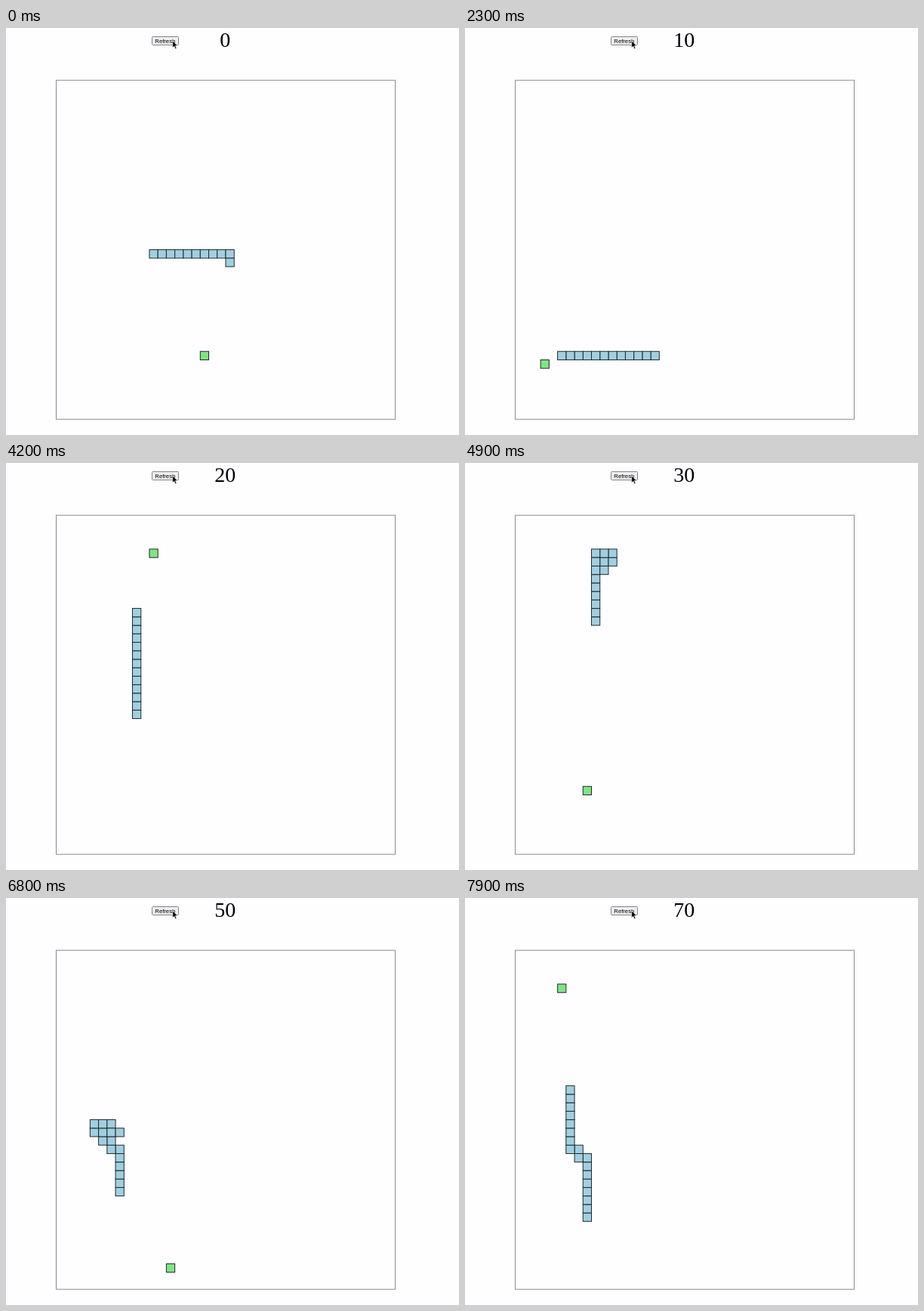
An HTML page that plays this animation: 600x539 px, repeating every 8000 ms.

```html
<!DOCTYPE html>
<html lang="en">
<head>
<meta charset="utf-8">
<title>Snake</title>
<style>
  html, body { margin: 0; width: 100%; height: 100%; overflow: hidden; background: #fefdff; }
  svg { display: block; }
  #score { font: 28px "Liberation Serif", Times, serif; text-anchor: middle; }
  #label { font: 7.7px "Liberation Sans", Arial, sans-serif; text-anchor: middle; }
  .cell { stroke: #1c2a30; stroke-width: 1; }
</style>
</head>
<body>
<svg width="600" height="539" viewBox="0 0 600 539">
  <rect x="193.5" y="11.5" width="35" height="11" rx="1" fill="#efeeef" stroke="#858585"/>
  <text id="label" x="210.8" y="19.8">Refresh</text>
  <path d="M220.7 16.8v9.3l2.1-1.9 1.5 3.5 1.6-.7-1.5-3.4h2.7z" fill="#000" stroke="#fff" stroke-width=".6"/>
  <text id="score" x="290.3" y="25"></text>
  <rect x="66.5" y="69.2" width="449" height="449" fill="none" stroke="#8c8c8c"/>
  <g id="board"></g>
</svg>
<script>
const LOOP = 8000, FRAME = 100;
const SIZE = 11.225, LEFT = 66.47, TOP = 69.08;
const FOODS = [[17, 32], [3, 33], [11, 4], [8, 32], [4, 20], [13, 37], [6, 22], [5, 4]];
// Milliseconds per step; the snake speeds up with every meal
const PACE = [100, 77, 59.5, 46, 34, 25.5, 20, 16];

const board = document.getElementById('board');
const score = document.getElementById('score');
const same = (a, b) => a[0] === b[0] && a[1] === b[1];

// Close the longer distance first; if the body is in the way, use the other axis
function nextCell([x, y], [fx, fy], body) {
  const dx = fx - x, dy = fy - y;
  const options = [[x + Math.sign(dx), y], [x, y + Math.sign(dy)]];
  if (Math.abs(dx) < Math.abs(dy)) options.reverse();
  return options.find(o => !body.some(c => same(c, o))) || options[0];
}

function simulate() {
  let body = Array.from({ length: 10 }, (_, i) => [11 + i, 20]).concat([[20, 21]]);
  let eaten = 0, time = -35;
  const states = [];
  while (time < LOOP) {
    states.push({ time, body, eaten });
    time += PACE[eaten];
    const head = nextCell(body[body.length - 1], FOODS[eaten], body);
    const ate = same(head, FOODS[eaten]);
    body = [...body.slice(ate ? 0 : 1), head];
    if (ate) eaten++;
  }
  return states;
}

const cell = ([x, y], fill) =>
  `<rect class="cell" x="${LEFT + x * SIZE}" y="${TOP + y * SIZE}" width="${SIZE}" height="${SIZE}" fill="${fill}"/>`;

const states = simulate();
let shown;

function draw(now) {
  const time = Math.floor((now % LOOP) / FRAME) * FRAME;
  const state = states.filter(s => s.time <= time).pop();
  if (state !== shown) {
    shown = state;
    score.textContent = state.eaten * 10;
    board.innerHTML = cell(FOODS[state.eaten], '#80e581') +
      state.body.map(c => cell(c, '#a2cfdf')).join('');
  }
}

const start = performance.now();
function tick() {
  draw(performance.now() - start);
  requestAnimationFrame(tick);
}
tick();
</script>
</body>
</html>
```
